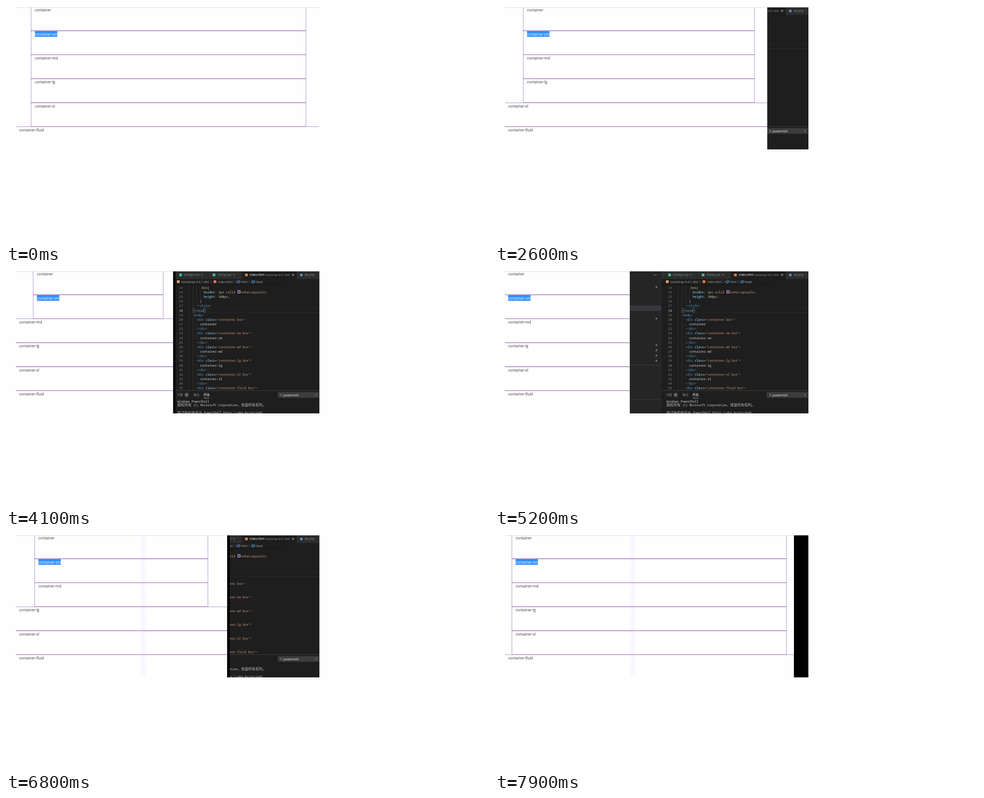
An HTML page that plays this animation: 1068x525 px, repeating every 8000 ms.

```html
<!DOCTYPE html>
<html lang="en">
<head>
<meta charset="utf-8">
<title>Responsive containers</title>
<style>
  html, body { margin: 0; width: 100%; height: 100%; overflow: hidden; background: #fefefe; }
  svg { display: block; width: 1068px; height: 525px; }
  text { white-space: pre; }
  .page { font: 8.05px "Open Sans", sans-serif; fill: #33373b; }
  .ui { font: 6.5px "Open Sans", sans-serif; }
  .code { font: 6.82px "Noto Sans Mono", monospace; }
  .term { font: 6.53px "Noto Sans Mono", monospace; fill: #ccc; }
  .cjk { font: 7.84px "Noto Sans CJK SC", "Noto Sans CJK", sans-serif; fill: #bbb; }
  .box { fill: none; stroke: #639; stroke-width: .533; }
</style>
</head>
<body>
<svg viewBox="0 0 1068 525">
  <defs>
    <clipPath id="stage"><rect x="22" y="3" width="671" height="316"/></clipPath>
    <clipPath id="view"><rect id="viewRect" x="22" y="3" height="316"/></clipPath>
  </defs>
  <g clip-path="url(#stage)">
    <g id="editor"></g>
    <rect id="frame" x="22" y="3" height="316"/>
    <g id="page" clip-path="url(#view)"></g>
  </g>
</svg>
<script>
const $ = id => document.getElementById(id);
const editor = $('editor'), page = $('page');

function add(parent, tag, attrs, text) {
  const el = document.createElementNS('http://www.w3.org/2000/svg', tag);
  for (const k in attrs) el.setAttribute(k, attrs[k]);
  if (text) el.textContent = text;
  parent.appendChild(el);
  return el;
}
const rect = (x, y, width, height, fill, more) =>
  add(editor, 'rect', { x, y, width, height, fill, ...more });
const dot = (cx, cy, r, fill) => add(editor, 'circle', { cx, cy, r, fill });
const path = (d, stroke, width = .7) =>
  add(editor, 'path', { d, stroke, 'stroke-width': width, fill: 'none' });
const label = (x, y, text, fill, cls = 'ui', more) =>
  add(editor, 'text', { x, y, fill, class: cls, ...more }, text);

// Sidebar and editor surfaces
rect(298, 3, 395, 316, '#1e1e1e');
rect(298, 3, 70, 316, '#252526');
rect(298, 79, 70, 12, '#37373d');
rect(298, 211.3, 70, .7, '#444446');
rect(298, 287.6, 70, .7, '#444446');
for (const x of [351.5, 354, 356.5]) dot(x, 11, .7, '#ccc');
for (const y of [38, 108, 167, 178.7, 190.4, 202]) dot(357, y, 2.1, '#77705f');

// Tabs
rect(368, 3, 325, 17, '#252526');
rect(368, 3, 78.5, 17, '#2d2d2d');
rect(447, 3, 74.5, 17, '#2d2d2d');
rect(522, 3, 120.5, 17, '#1e1e1e');
rect(643, 3, 50, 17, '#2d2d2d');
rect(383, 8, 6, 6, '#41b883');
label(393.5, 13.3, 'Childyz.vue', '#5fa37a');
label(431, 13.3, 'U', '#5fa37a');
rect(457, 8, 6, 6, '#41b883');
label(467.5, 13.3, 'Childy.vue', '#5fa37a');
label(502, 13.3, 'U', '#5fa37a');
rect(528.5, 8, 6, 6, '#e37933');
label(539, 13.3, 'index.html', '#fff');
label(574, 13.3, 'bootstrap-4.4.1-dist', '#a5a5a5', 'ui', { style: 'font-size:5.85px' });
path('M632.5 8.5l4.6 4.6m0-4.6l-4.6 4.6', '#ddd', .9);
dot(653, 11, 3, '#4f8fb5');
label(660.5, 13.3, 'db.php', '#8c8c8c');

// Breadcrumb
rect(378, 23, 6, 6, '#d9a867');
label(388, 28.5, 'bootstrap-4.4.1-dist', '#a9a9a9', 'ui', { style: 'font-size:6.65px' });
rect(459, 23, 6, 6, '#e37933');
label(469, 28.5, 'index.html', '#a9a9a9');
label(520, 28.5, 'html', '#a9a9a9');
label(552.3, 28.5, 'head', '#a9a9a9');
for (const x of [452.5, 505, 537]) path(`M${x} 23.5l2.5 2.7l-2.5 2.7`, '#999');
for (const x of [514, 546.5])
  path(`M${x - 3.5} 25l3-2l4 1.3v3.2l-3.5 2l-3.5-1.5zl3.5 1.2l4-1.8m-4 1.8v3.3`, '#75beff');
rect(368, 32.4, 248, .8, '#111');

// Code
const COL = 4.092, ROW = 10.16;
const rowY = n => 39.5 + ROW * (n - 13);
const TAG = '#569cd6', ATTR = '#9cdcfe', STR = '#ce9178', NUM = '#b5cea8',
      TXT = '#d4d4d4', PUNCT = '#808080';

function code(n, x, ...parts) {
  const t = label(x, rowY(n) + 2.3, '', TXT, 'code');
  for (const [text, fill] of parts) add(t, 'tspan', { fill }, text);
}
const guide = (x, from, to) =>
  rect(x, rowY(from) - ROW / 2, .6, ROW * (to - from + 1), '#404040');
const tag = (n, x, name) => code(n, x,
  [name[0] === '/' ? '</' : '<', PUNCT], [name.replace('/', ''), TAG], ['>', PUNCT]);

guide(404.5, 13, 35);
guide(413, 13, 17);
guide(413, 20, 35);
guide(421, 13, 16);
guide(429, 14, 15);
for (const y of [85.4, 94.6])
  add(editor, 'path', { d: `M405 ${y}H692`, stroke: '#454545', 'stroke-width': .6, 'stroke-dasharray': '1 1' });
for (const x of [413, 437.5])
  rect(x, 85.6, COL, 8.8, 'none', { stroke: '#888', 'stroke-width': .5 });
for (let n = 13; n <= 35; n++)
  label(391, rowY(n) + 2.3, n, n === 18 ? '#d0d0d0' : '#858585', 'code', { 'text-anchor': 'end' });

code(13, 429, ['.box', '#d7ba7d'], ['{', TXT]);
code(14, 437, ['border', ATTR], [': ', TXT], ['1px', NUM], [' solid', STR]);
rect(512.5, 45.8, 5.6, 5.8, '#639', { stroke: '#eee', 'stroke-width': .7 });
code(14, 520, ['rebeccapurple', STR], [';', TXT]);
code(15, 437, ['height', ATTR], [': ', TXT], ['100px', NUM], [';', TXT]);
code(16, 429, ['}', TXT]);
tag(17, 421, '/style');
tag(18, 413, '/head');
tag(19, 413, 'body');

const names = ['', '-sm', '-md', '-lg', '-xl', '-fluid'].map(s => 'container' + s);
names.forEach((name, i) => {
  const n = 20 + 3 * i;
  code(n, 421, ['<', PUNCT], ['div', TAG], [' class', ATTR], ['=', TXT], [`"${name} box"`, STR], ['>', PUNCT]);
  if (i === 5) return;
  guide(421, n + 1, n + 1);
  code(n + 1, 429, [name, TXT]);
  tag(n + 2, 421, '/div');
});

// Terminal
rect(368, 268, 325, 51, '#1e1e1e');
rect(368, 267.8, 325, .8, '#4a4a4a');
const small = { style: 'font-size:6.4px' };
label(378.5, 280.4, '问题', '#8c8c8c', 'cjk', { style: 'font-size:6.4px;fill:#8c8c8c' });
dot(399.5, 278, 4.9, '#4d4d4d');
label(399.5, 280.2, '1', '#fff', 'ui', { 'text-anchor': 'middle' });
label(414.5, 280.4, '输出', '#8c8c8c', 'cjk', { style: 'font-size:6.4px;fill:#8c8c8c' });
label(437, 280.4, '终端', '#e7e7e7', 'cjk', { style: 'font-size:6.4px;fill:#e7e7e7' });
rect(437, 284.6, 12.5, .7, '#e7e7e7');
rect(601, 271.5, 91, 12.7, '#3c3c3c');
label(606.5, 280.5, '1: powershell', '#f0f0f0');
path('M683 276.8l2.2 2.2l2.2-2.2', '#ccc');
const CELL = 3.92;
const term = (col, y, text, cls = 'term') => label(379 + col * CELL, y, text, '#ccc', cls);
term(0, 294.6, 'Windows PowerShell');
term(0, 303.3, '版权所有', 'cjk');
term(9, 303, '(C) Microsoft Corporation');
term(34, 303.3, '。保留所有权利。', 'cjk');
term(0, 320.6, '尝试新的跨平台', 'cjk');
term(15, 320.3, 'PowerShell https://aka.ms/pscore6');

// Web page
const SCALE = .5333, LEFT = 20.5, STEP = 53.333;
add(page, 'rect', { x: 22, y: 3, width: 671, height: 316, fill: '#fefefe' });
const trail = add(page, 'rect', { x: 298, y: 3, width: 12, height: 316, fill: '#f9f8fe' });
add(page, 'rect', { x: 22, y: 3, width: 671, height: 1, fill: '#dedbe4' });
const boxes = names.map((name, i) => {
  const y = 268.43 - STEP * (5 - i);
  const box = add(page, 'rect', { class: 'box', y: y + .267, height: STEP - .533 });
  const mark = i === 1 && add(page, 'rect', { y: 56, width: 49.6, height: 12.6, fill: '#3390ff' });
  const text = add(page, 'text', { class: 'page', y: y + 10.5 }, name);
  if (mark) text.style.fill = '#fff';
  return { box, mark, text };
});

// Breakpoint, container width, and the last box kind it applies to
const breakpoints = [[1200, 1140, 4], [992, 960, 3], [768, 720, 2], [576, 540, 1]];

function track(points, t) {
  let i = 1;
  while (i < points.length - 1 && t > points[i][0]) i++;
  const [t0, a] = points[i - 1], [t1, b] = points[i];
  return a + (b - a) * Math.min(1, Math.max(0, (t - t0) / (t1 - t0)));
}
const content = [[1500, 693], [1800, 685], [2100, 668], [2400, 630], [2600, 602], [3300, 500.3], [3400, 492],
  [4200, 352], [4500, 322], [4800, 307], [4900, 307], [5200, 298], [5600, 298], [5900, 330],
  [6500, 420], [6800, 489], [7400, 619], [7900, 661]];
const outer = [[1500, 693], [1800, 685], [2100, 668], [2400, 630], [2600, 602], [3300, 515], [3400, 498],
  [4200, 357], [4500, 325], [4800, 308], [4900, 308], [5200, 298], [5600, 298], [5900, 333],
  [6500, 425], [6800, 495], [7400, 633], [7900, 692.5]];

// The layout trails the window while it shrinks
function layoutEdge(t) {
  if (t < 100) return 698.2;
  if (t < 600) return 695;
  if (t < 700) return 693.5;
  if (t < 5700) return Math.max(300, Math.min(692.3, track(content, t - 100)));
  return track(content, t) + .4;
}

function draw(now) {
  const t = Math.floor(now % 8000 / 100) * 100;
  const edge = layoutEdge(t), full = edge - LEFT;
  $('viewRect').setAttribute('width', track(content, t) - 22);
  $('frame').setAttribute('width', track(outer, t) - 22);
  trail.setAttribute('visibility', t >= 5700 ? 'visible' : 'hidden');
  const hit = breakpoints.find(b => full / SCALE >= b[0]);
  boxes.forEach(({ box, mark, text }, i) => {
    const width = hit && i <= hit[2] ? hit[1] * SCALE : full;
    const x = LEFT + (full - width) / 2;
    box.setAttribute('x', x + .267);
    box.setAttribute('width', width - .533);
    text.setAttribute('x', x + 8.53);
    if (mark) mark.setAttribute('x', x + 8.53);
  });
}

const start = performance.now();
(function loop() {
  draw(performance.now() - start);
  requestAnimationFrame(loop);
})();
</script>
</body>
</html>
```
